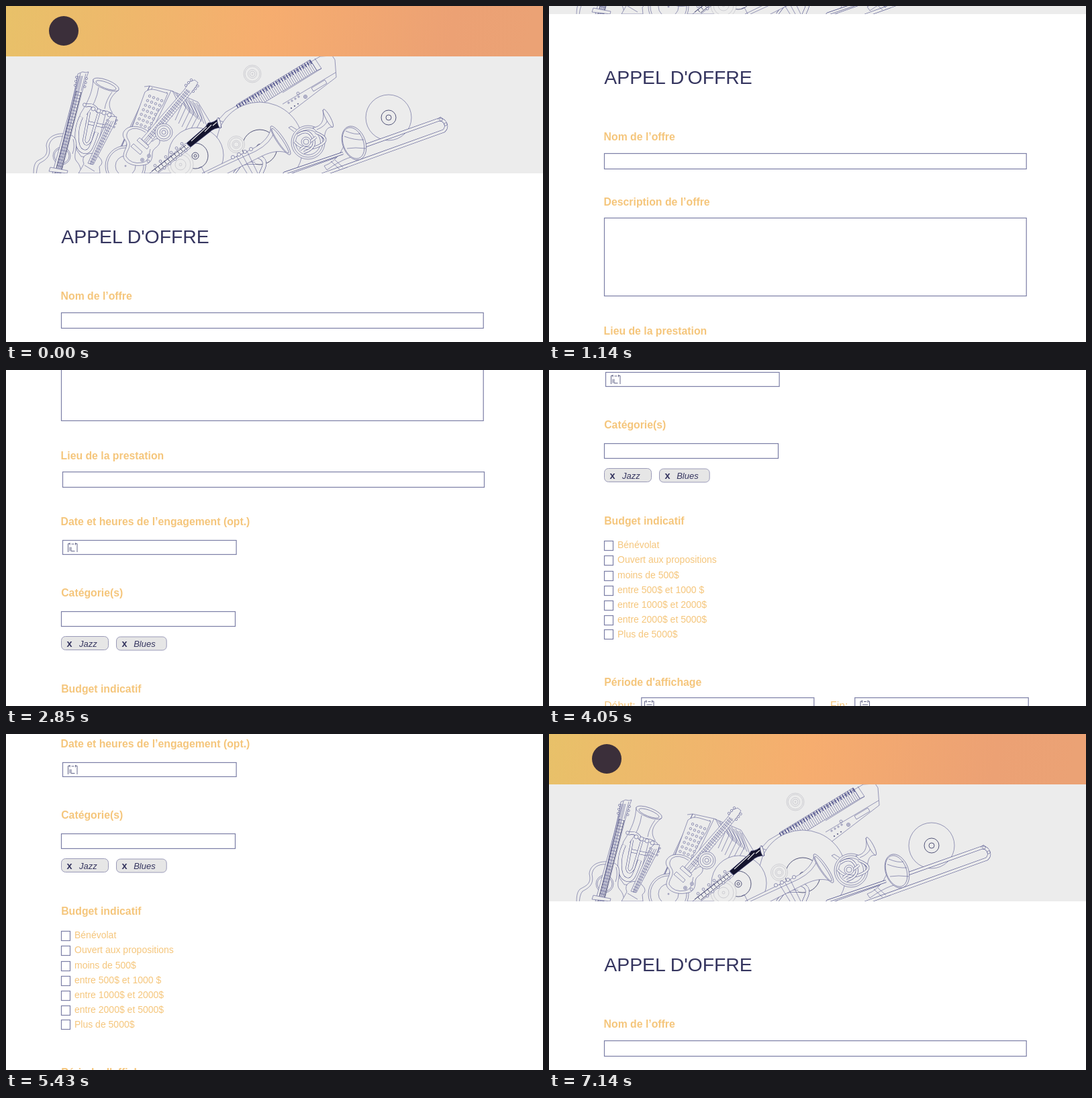
Recreate the animation shown at these times as an HTML page. Size 800 by 500 pixels, loop 7.17 s.

```html
<!DOCTYPE html>
<html lang="fr">
<head>
<meta charset="utf-8">
<title>Appel d'offre</title>
<style>
html, body { margin: 0; width: 100%; height: 100%; overflow: hidden; background: #fff; }
#stage { position: fixed; inset: 0; overflow: hidden; contain: strict; }
#page { display: block; will-change: transform; }
text { font-family: "Liberation Sans", Arial, sans-serif; fill: #f5c67c; white-space: pre; }
.title { font-size: 28.4px; fill: #35355f; }
.label { font-size: 15.8px; font-weight: bold; }
.side { font-size: 15.8px; }
.option { font-size: 14px; }
.tag { font-size: 13px; font-style: italic; fill: #35355f; }
.cross { font-size: 14.5px; font-weight: bold; fill: #35355f; }
.box { fill: #fff; stroke: #7b7ea6; stroke-width: 1.2; }
.pill { fill: #e6e6e6; stroke: #9a9ab8; }
.icon { fill: none; stroke: #55587f; stroke-width: .9; }
#art { stroke: #4a4c88; stroke-width: .55; fill: none; stroke-linejoin: round; }
#art .f { fill: #ececec; }
#art .k { fill: #14142e; }
#art .pale { stroke: #b5b5bd; }
#art .bold { stroke: #2c2f5c; stroke-width: .8; }
</style>
</head>
<body>
<div id="stage">
<svg id="page" width="800" height="1540" viewBox="0 0 800 1540">
  <defs>
    <linearGradient id="sky" gradientUnits="userSpaceOnUse" x1="0" y1="0" x2="760" y2="150">
      <stop offset="0" stop-color="#e8c169"/>
      <stop offset=".5" stop-color="#f6ad6f"/>
      <stop offset=".85" stop-color="#eca174"/>
      <stop offset="1" stop-color="#eba275"/>
    </linearGradient>
    <clipPath id="band"><path d="M0 75H800V249H0z"/></clipPath>
  </defs>
  <path fill="url(#sky)" d="M0 0H800V75H0z"/>
  <circle cx="86" cy="37" r="22" fill="#3b2f3a"/>
  <path fill="#ececec" d="M0 75H800V249H0z"/>
  <g clip-path="url(#band)"><g id="art"></g></g>
  <g id="form"></g>
</svg>
</div>
<script>
const $ = id => document.getElementById(id);

// --- drawing helpers, all returning SVG markup ---
const path = (d, cls = '') => `<path class="${cls}" d="${d}"/>`;
const ring = (x, y, radii, cls = '') => radii.map((r, i) =>
  `<circle class="${i ? '' : 'f '}${cls}" cx="${x}" cy="${y}" r="${r}"/>`).join('');
const oval = (x, y, rx, ry, turn, cls = 'f') =>
  `<ellipse class="${cls}" cx="${x}" cy="${y}" rx="${rx}" ry="${ry}" transform="rotate(${turn} ${x} ${y})"/>`;
// outlined pipe along a path
const tube = (d, w) => `<path d="${d}" stroke-width="${w}"/>` +
  `<path d="${d}" stroke="#ececec" stroke-width="${w - 1.1}"/>`;
// n short strokes across the line from a to b, reaching l and r to its sides
const ticks = (x1, y1, x2, y2, n, l, r = l) => {
  const len = Math.hypot(x2 - x1, y2 - y1), ux = (y1 - y2) / len, uy = (x2 - x1) / len;
  let d = '';
  for (let i = 0; i <= n; i++) {
    const x = x1 + (x2 - x1) * i / n, y = y1 + (y2 - y1) * i / n;
    d += `M${x - ux * l} ${y - uy * l}L${x + ux * r} ${y + uy * r}`;
  }
  return path(d);
};
const dots = (x, y, dx, dy, n, r, cls = 'f') => Array.from({ length: n }, (_, i) =>
  `<circle class="${cls}" cx="${x + dx * i}" cy="${y + dy * i}" r="${r}"/>`).join('');

const keyboard = () =>
  path('M316 170L327 158L468 75L486 74L490 80L492 106L420 161L380 190z', 'f') +
  path('M343 147L453 80L463 96L353 163M412 146L491 99M463 96L470 93L460 78M470 93L412 129') +
  ticks(348, 155, 458, 88, 40, 9.3) +
  `<g stroke-width="1.4">${ticks(348, 155, 457, 88.6, 28, 9, -3)}</g>` +
  dots(421, 144, 5, -3, 4, 1.2) + dots(425, 152, 5, -3.2, 3, .7, 'k') +
  ring(446, 135, [2.6, 1.2]) + ring(435, 130, [2]) + path('M455 122L475 110L478 115L458 127z');

const accordion = () =>
  path('M214 119L246 126L286 143L306 176L262 249H162L160 232L187 180z', 'f') +
  path('M214 119L160 232M218 121L166 236M246 126L204 214M240 128L192 222M206 120L214 119') +
  path('M207 128Q214 122 224 125L241 130Q236 146 225 160L211 187Q205 190 187 183z', 'f') +
  [0, 1, 2, 3].map(i => dots(214 + i * 6, 134 + i * 2.3, -3.1, 6.8, 7, 1.7)).join('') +
  [0, 1, 2, 3, 4, 5, 6].map(i =>
    path(`M${248 + i * 6} ${126 + i * 3}L${256 + i * 6} ${143 + i * 4}L${247 + i * 5} ${165 + i * 5}`) +
    path(`M${251 + i * 6} ${129 + i * 3}L${275 + i * 4} ${160 + i * 3}`)).join('') +
  path('M190 190L180 222M180 188L171 214');

const euphonium = () =>
  path('M130 109C129 126 124 140 111 160Q103 180 105 214L112 224L128 226Q143 215 146 196C152 176 158 166 158 158C149 145 157 133 168 125z', 'f') +
  oval(149, 117, 20.5, 7, 21) + oval(149, 118, 16, 4.5, 21, '') +
  path('M138 121Q135 143 120 162M158 128Q149 140 147 153') +
  tube('M118 148C128 146 133 149 136 156L151 159C166 164 164 176 151 180L119 173', 5) +
  tube('M112 165C103 184 103 211 114 216S128 208 135 188', 6) +
  tube('M124 158L116 200Q119 211 126 200L138 160', 4) +
  ring(117, 147, [2.5]) + dots(130, 153, 8, 3, 4, 3) + path('M148 162L138 202');

const acoustic = () =>
  path('M88 190C72 189 61 196 60 208C64 224 54 226 46 231C41 236 41 244 41 256H112C113 244 110 236 105 231C99 224 107 212 104 200C102 194 98 191 88 190z', 'f') +
  path('M85 194C73 193 65 199 64 209C68 225 57 230 50 234Q45 239 45 256M100 198Q103 209 99 220') +
  ring(83, 223, [13, 11]) +
  path('M103 126L107 101L114 98L119 99L123 98L120 106L113 129L82 249H69z', 'f') +
  `<g class="bold">${path('M105 126L73 249M112 128L81 249')}</g>` +
  path('M107 104L75 249M109 104L76.5 249M112 104L78 249M114 104L79.5 249M111 100L105 124M119 101L112 126') +
  ticks(108, 128, 79, 238, 24, 4) +
  dots(105, 106, -1, 6, 3, 1.6) + dots(120, 108, -1.3, 6, 3, 1.6) + path('M66 240L92 245L91 249L64 246z', 'f');

const violin = () =>
  path('M120 221Q112 225 116 235L108 249H140L139 239Q147 233 139 225Q130 216 120 221z', 'f') +
  path('M151 170L157 164L165 165L161 177L130 236L122 234z', 'f') +
  path('M154 170L125 235M157 171L126 236M160 171L128 236') +
  ticks(155, 178, 128, 232, 14, 3.4) + dots(151, 170, -2, 5, 3, 1.3) + dots(165, 170, -2, 5, 3, 1.3) +
  path('M117 237L132 246');

const electric = () =>
  path('M213 188C205 180 191 177 182 181C173 186 172 193 178 200C184 209 174 214 175 225C178 235 192 239 203 237C215 236 218 229 218 220C218 211 227 211 229 203C230 196 223 196 219 201C213 202 211 195 213 188z', 'f') +
  path('M208 188Q193 178 183 185Q177 192 182 199C189 209 178 216 179 224Q186 236 203 233C214 231 213 219 215 213') +
  path('M266 124L273 113L281 110L286 114L282 121L276 129L212 207L202 198z', 'f') +
  path('M270 124L206 200M272 125L207.5 202M274 126L209 204') +
  ticks(271, 127, 215, 195, 22, 4.4) +
  dots(268, 118, 4, -4, 3, 1.7) + dots(279, 127, 3.3, -4, 3, 1.7) +
  path('M199 196L213 209L210 213L195 200zM190 205L203 217L200 221L186 209z', 'f') +
  ring(203, 229, [2.5, 1]) + ring(213, 223, [2.5, 1]) + ring(212, 231, [2]);

const clarinet = () =>
  path('M268 204L275 211L226 249H214z', 'f') +
  path('M301 174Q312 173 317 166L321 181Q310 181 303 188L275 210L269 204L292 184Q298 180 301 174z', 'k') +
  `<g class="bold">${path('M268 207L217 246M272 210L226 247')}${ticks(266, 210, 223, 244, 9, 3)}</g>` +
  `<g stroke="#ececec" stroke-width="1.1">${path('M299 180L276 201M306 177L296 187M314 173L308 178')}</g>` +
  oval(317.5, 174, 2.2, 8, -14) + dots(262, 205, -8, 6.5, 6, 1.9) + dots(268, 215, -8, 6.5, 5, 1.9);

const trumpet = () =>
  tube('M322 249L337 233Q348 223 364 224H376Q388 228 384 240L377 256', 6) +
  tube('M340 249L349 237Q355 233 371 234', 4) +
  path('M292 249L364 214C383 205 394 193 395 179L423 220C409 214 397 216 382 223L316 256z', 'f') +
  path('M300 249L372 216Q395 204 400 186') +
  oval(409, 200, 5.5, 25.5, -34) + oval(408.5, 200.5, 3.4, 22, -34, '') +
  path('M343 223L359 249M351 220L367 249M359 216L375 249') +
  dots(338, 225, 9, -4, 4, 2.6) + path('M287 241L291 239L296 249');

const horn = () =>
  ring(450, 203, [25, 22, 18.5]) +
  path('M457 181C470 180 475 170 472 155L487 180C478 180 475 185 474 199z', 'f') +
  path('M463 184Q476 179 479 170') + oval(480, 167, 3.5, 15, -28) +
  tube('M430 202Q445 218 466 208T461 188', 4) + tube('M434 192Q450 181 457 196T444 218', 4) +
  tube('M438 214L462 195', 4) + ring(447, 202, [7, 4]) +
  path('M429 187L421 181L425 179L433 184');

const trombone = () =>
  tube('M402 255L645 169C653 168 660 179 652 186L471 251', 5) +
  path('M474 238Q504 227 510 181L532 224Q513 219 478 244z', 'f') +
  tube('M414 249L502 219', 4) + path('M484 231L497 243M490 229L502 240') +
  oval(518.5, 204, 17, 26, -20) + oval(517.5, 204, 15, 24, -20, '') +
  path('M506 186Q520 192 528 190M504 194Q520 200 533 199M508 212Q520 210 536 212') +
  ring(648, 169, [2.2]) + ring(655, 176, [2.2]) + path('M643 169L647 165L651 168');

$('art').innerHTML =
  ring(570, 166, [34]) + ring(570, 166, [11, 4], 'bold') +
  ring(367, 101, [13, 11, 6.5, 4, 1], 'pale') +
  keyboard() +
  ring(378, 208, [65]) + ring(378, 210, [26, 4.5], 'bold') +
  accordion() + euphonium() + acoustic() + violin() +
  ring(283, 222, [41]) + ring(282, 223, [19, 5, 2], 'bold') +
  ring(178, 238, [30, 27, 15, 1]) + electric() +
  ring(235, 188, [13, 10, 6, 3]) + ring(260, 236, [19, 15, 8, 2], 'pale') +
  ring(343, 206, [12.5, 10, 6, 4], 'pale') +
  clarinet() + trumpet() + horn() + trombone();

// --- the form ---
const text = (x, y, cls, s) => `<text x="${x}" y="${y}" class="${cls}">${s}</text>`;
const box = (x, y, w, h, cls = 'box', r = 0) =>
  `<rect class="${cls}" x="${x}" y="${y}" width="${w}" height="${h}" rx="${r}"/>`;
const calendar = (x, y, full) => path(
  `M${x} ${y + 13.5}V${y + 1}H${x + 3}M${x + 5} ${y + 1.5}H${x + 9}M${x + 11} ${y + 1}H${x + 13.5}V${y + 13.5}` +
  `M${x + 2.5} ${y - .5}V${y + 3}M${x + 11} ${y - .5}V${y + 3}` +
  (full ? `M${x} ${y + 13.5}H${x + 13}M${x + 3} ${y + 6}H${x + 11}M${x + 3} ${y + 8.5}H${x + 11}`
        : `M${x + 2.5} ${y + 6}V${y + 12}M${x + 4.5} ${y + 6}V${y + 12}H${x + 10}`), 'icon');
const tag = (x, y, w, name, dx) => box(x, y, w, 20, 'pill', 6) +
  text(x + 8, y + 15, 'cross', 'x') + text(x + dx, y + 15, 'tag', name);

const options = ['Bénévolat', 'Ouvert aux propositions', 'moins de 500$', 'entre 500$ et 1000 $',
  'entre 1000$ et 2000$', 'entre 2000$ et 5000$', 'Plus de 5000$'];
const rows = [0, 22, 45, 67, 89, 111, 132];

$('form').innerHTML =
  text(82.3, 352.8, 'title', "APPEL D'OFFRE") +
  text(81.6, 436.5, 'label', 'Nom de l’offre') + box(82.5, 456.5, 628.7, 23) +
  text(81.6, 534, 'label', 'Description de l’offre') + box(82.5, 552.5, 628.7, 116) +
  text(81.6, 726, 'label', 'Lieu de la prestation') + box(84.5, 744.7, 628, 22.8) +
  text(81.6, 824, 'label', 'Date et heures de l’engagement (opt.)') + box(84.5, 846.5, 258.6, 21) +
  calendar(92.5, 850.5) +
  text(82.2, 930, 'label', 'Catégorie(s)') + box(82.5, 952.5, 259, 22) +
  tag(82.5, 989.5, 70, 'Jazz', 26.5) + tag(164.5, 990, 74.7, 'Blues', 25.7) +
  text(82.2, 1072.5, 'label', 'Budget indicatif') +
  options.map((s, i) => box(82.5, 1097.5 + rows[i], 13, 14) +
    text(102, 1108 + rows[i] + (i == 6 ? 1 : 0), 'option', s)).join('') +
  text(82.2, 1313, 'label', "Période d'affichage") +
  text(82.2, 1348, 'side', 'Début:') + box(137.8, 1330.7, 257, 22) + calendar(142.5, 1335, true) +
  text(419, 1348, 'side', 'Fin:') + box(455.7, 1330.7, 258.5, 22) + calendar(464, 1335, true);

// --- slow scroll down, quicker scroll back up ---
const LOOP = 7170, STEP = 30, TURN = 4949, DEPTH = 1031.2, END = LOOP - STEP;
const start = performance.now();
function draw() {
  const t = Math.floor((performance.now() - start) % LOOP / STEP) * STEP;
  const y = t < TURN ? DEPTH * t / TURN : DEPTH * (END - t) / (END - TURN);
  $('page').style.transform = `translateY(${-Math.floor(y)}px)`;
  requestAnimationFrame(draw);
}
draw();
</script>
</body>
</html>
```
